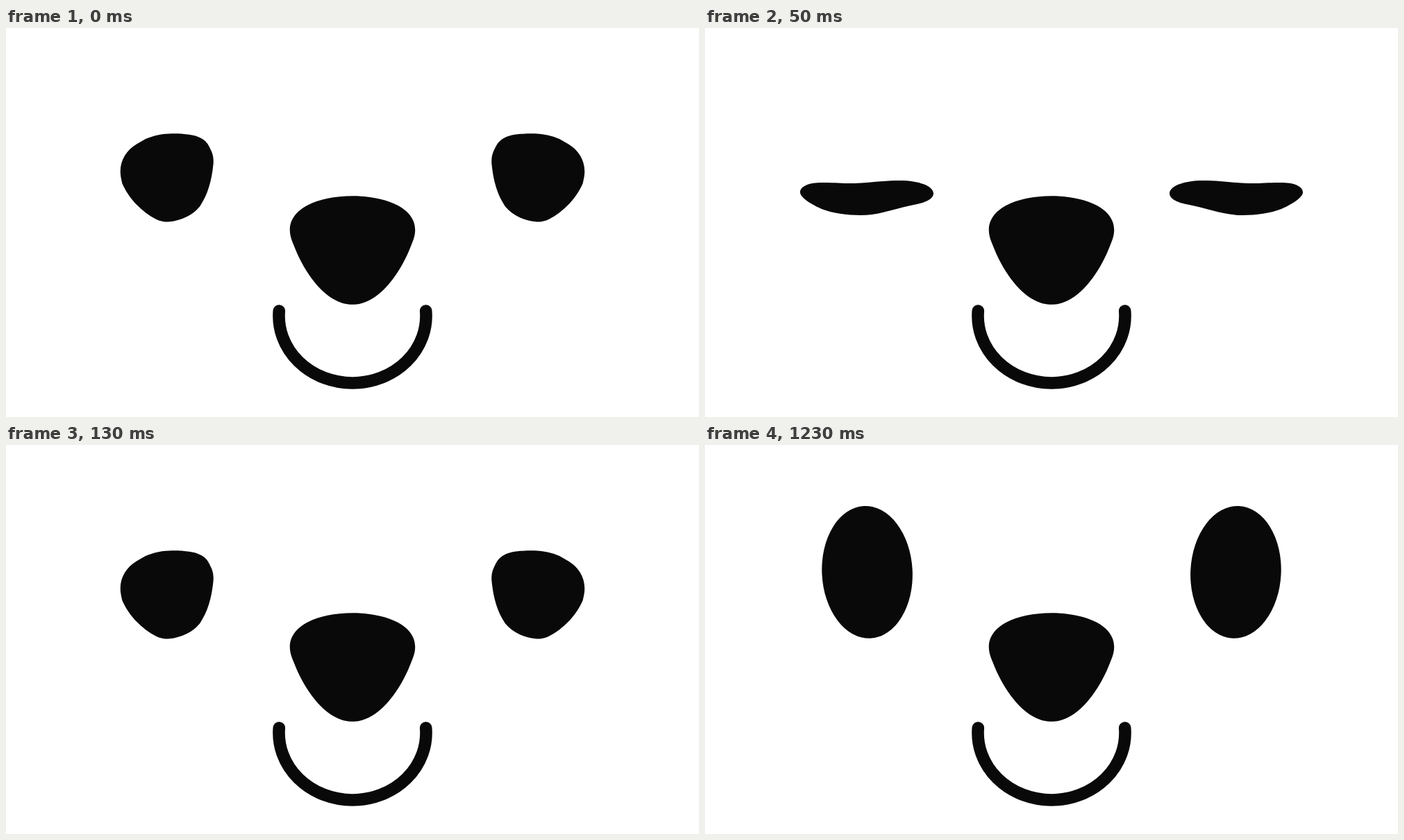
An HTML page for the animation above (1950 ms loop, 998 px wide and 561 px high).

```html
<!DOCTYPE html>
<html lang="en">
<head>
<meta charset="utf-8">
<title>Blinking face</title>
<style>
  html, body { margin: 0; width: 100%; height: 100%; overflow: hidden; background: #fff; }
  svg { display: block; width: 100%; height: 100%; fill: #090909; }
  .mouth { fill: none; stroke: #090909; stroke-width: 17.6; stroke-linecap: round; }
</style>
</head>
<body>
<svg viewBox="0 0 998 561">
  <defs>
    <path id="half" d="M164.7 207C164.7 190 174 176 188 167.5L201 160C213 155 226 152.3 239 152.3C262 152.3 275 154 285 161.5C291 166 293 172 296 178C299 185 299 192 298.5 197C296 222 290 241 279 257.5C267 272 250 277.5 236 279.3C231 280 224 279.5 216.5 276C194.5 264.5 177 246 167.3 224C165.7 217 164.7 212 164.7 207Z"/>
    <path id="shut" d="M137 237C137 229 148 223.5 165 223C185 222.5 200 224.5 215 224C237 223.5 255 220 281 220C308 220 329 228 329 238.5C329 247 316 252 303 254.5C290 257 280 260 268 263C253 267 240 270 224 270C205 270 183 267 168 261C152 254 137 244 137 237Z"/>
    <ellipse id="open" cx="233.6" cy="183.4" rx="65.2" ry="95.5" transform="rotate(-2.8 233.6 183.4)"/>
  </defs>
  <path d="M499 242.3C548 242.3 589.2 260 589.2 291C589.2 299 587 305 583.3 314C571 346.5 548 380.5 523.5 392.5C514 397.5 507 398.7 499 398.7C491 398.7 484 397.5 474.5 392.5C450 380.5 427 346.5 414.7 314C411 305 408.8 299 408.8 291C408.8 260 450 242.3 499 242.3Z"/>
  <path class="mouth" d="M393.3 408A106 96.7 0 1 0 604.7 408"/>
  <g id="eyes"></g>
</svg>
<script>
  const LOOP = 1950;
  // [start ms, eye shape]
  const steps = [[0, 'half'], [50, 'shut'], [100, 'half'], [150, 'open']];
  const eyes = document.getElementById('eyes');

  function addEye(mirrored) {
    const eye = document.createElementNS('http://www.w3.org/2000/svg', 'use');
    if (mirrored) eye.setAttribute('transform', 'matrix(-1 0 0 1 998 0)');
    eyes.append(eye);
    return eye;
  }

  const pair = [addEye(false), addEye(true)];
  const start = performance.now();
  let shown = '';

  function draw(now) {
    const t = Math.max(0, now - start) % LOOP;
    const shape = steps.findLast(([at]) => at <= t)[1];
    if (shape !== shown) {
      pair.forEach(eye => eye.setAttribute('href', '#' + shape));
      shown = shape;
    }
    requestAnimationFrame(draw);
  }
  draw(start);
</script>
</body>
</html>
```
